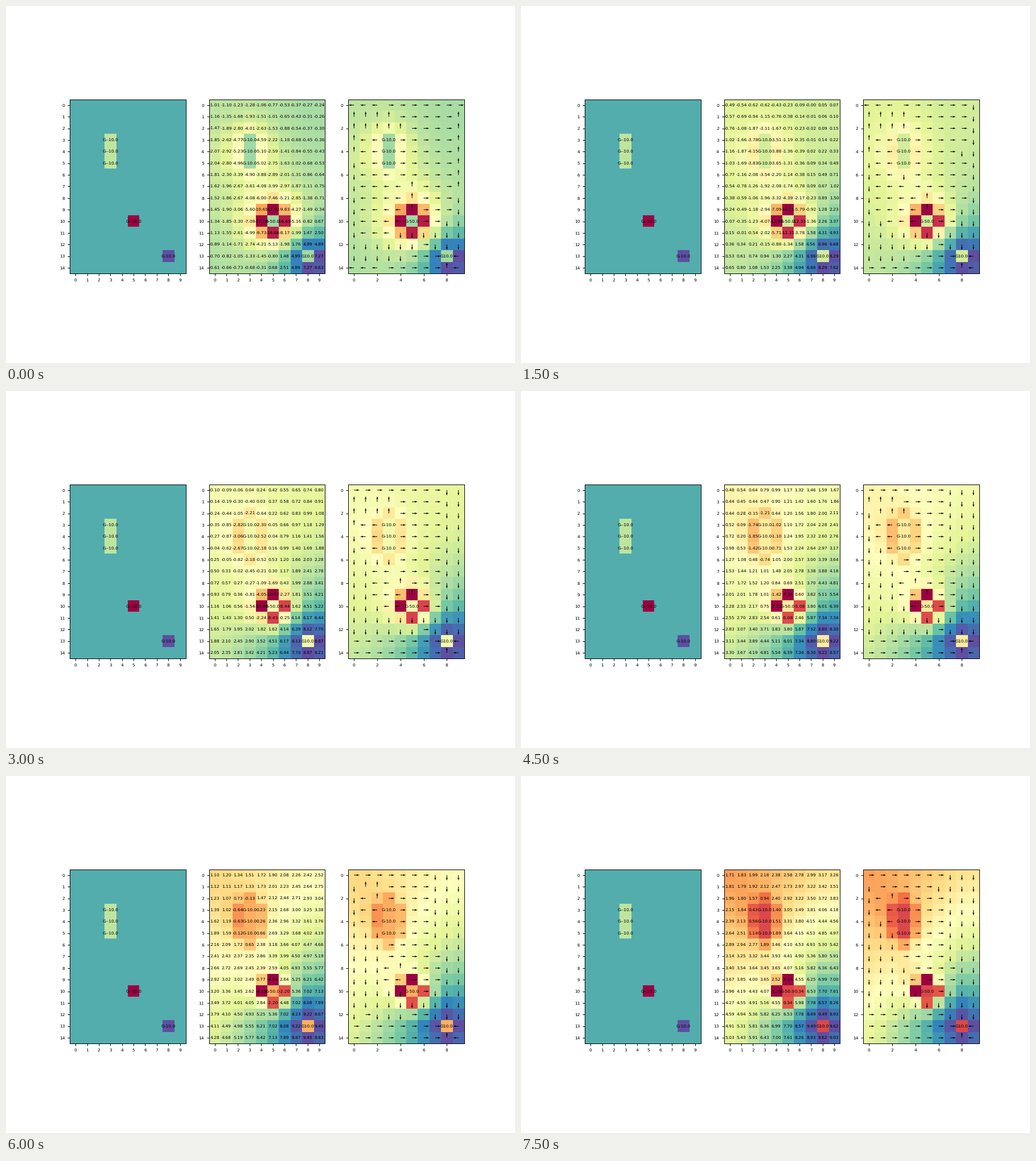
Recreate the animation shown at these times as a matplotlib script. Size 894x626 px, loop 8000 ms.

```python
import numpy as np
import matplotlib.pyplot as plt
from matplotlib.animation import FuncAnimation

W, H, DPI = 894, 626, 89.4
ROWS, COLS = 15, 10
GAMMA, TOLERANCE = 0.95, 0.01
GOALS = {(3, 3): -10.0, (4, 3): -10.0, (5, 3): -10.0,
         (10, 5): -50.0, (13, 8): 10.0}
MOVES = [(0, -1), (0, 1), (-1, 0), (1, 0)]  # left, right, up, down
STEPS, HOLD, TICK_MS, TICKS = 6, 3, 500, 16

reward = np.zeros((ROWS, COLS))
for cell, r in GOALS.items():
    reward[cell] = r
is_goal = reward != 0
ys, xs = np.nonzero(~is_goal)


def action_values(values, p):
    """Expected return of each move; a slip picks one of the other three."""
    ahead = np.pad(GAMMA * values, 1, mode="edge") + np.pad(reward, 1)
    near = np.array([ahead[1 + dy:ROWS + 1 + dy, 1 + dx:COLS + 1 + dx]
                     for dy, dx in MOVES])
    slip = (1 - p) / 3
    return slip * near.sum(axis=0) + (p - slip) * near


def solve(p):
    """Value iteration until one sweep changes the grid by very little."""
    values, change = np.zeros((ROWS, COLS)), np.inf
    while change > TOLERANCE:
        old = values
        values = np.where(is_goal, 0, action_values(old, p).max(axis=0))
        change = np.linalg.norm(values - old)
    best = action_values(values, p).round(9).argmax(axis=0)
    return values, best[~is_goal]


solutions = [solve(0.325 + 0.075 * k) for k in range(STEPS)]

plt.rcParams.update({"font.size": 6, "font.family": "DejaVu Sans",
                     "text.hinting": "no_hinting"})
fig, axes = plt.subplots(1, 3, dpi=DPI,
                         figsize=((W + 1e-6) / DPI, (H + 1e-6) / DPI))
fig.subplots_adjust(left=0.1253, right=0.9003, bottom=0.1095, top=0.8795)


def label(ax, x, y, text):
    return ax.text(x, y, text, ha="center", va="center", color="black")


def grid(ax, data, step, prefix):
    image = ax.imshow(data, cmap="Spectral")
    ax.set_xticks(range(0, COLS, step))
    ax.set_yticks(range(0, ROWS, step))
    for (y, x), r in GOALS.items():
        label(ax, x, y, f"{prefix}{r}")
    return image


grid(axes[0], reward, 1, "G-")
heat = [grid(axes[1], reward, 1, "G"), grid(axes[2], reward, 2, "G")]
numbers = [label(axes[1], x, y, "") for y, x in zip(ys, xs)]
arrows = axes[2].quiver(xs, ys, np.ones(len(xs)), np.zeros(len(xs)),
                        units="x", width=0.049, scale_units="x", scale=2.12)
directions = np.array(MOVES)


def draw(i):
    values, best = solutions[i // HOLD]
    for image in heat:
        image.set_data(values)
        image.set_clim(values.min(), values.max())
    for text, v in zip(numbers, values[~is_goal]):
        text.set_text(f"{v:.2f}")
    dy, dx = directions[best].T
    arrows.set_UVC(dx, -dy)
    return [*heat, *numbers, arrows]


anim = FuncAnimation(fig, draw, frames=TICKS, interval=TICK_MS,
                     init_func=lambda: draw(0), repeat=True, repeat_delay=0)
plt.show()
```
